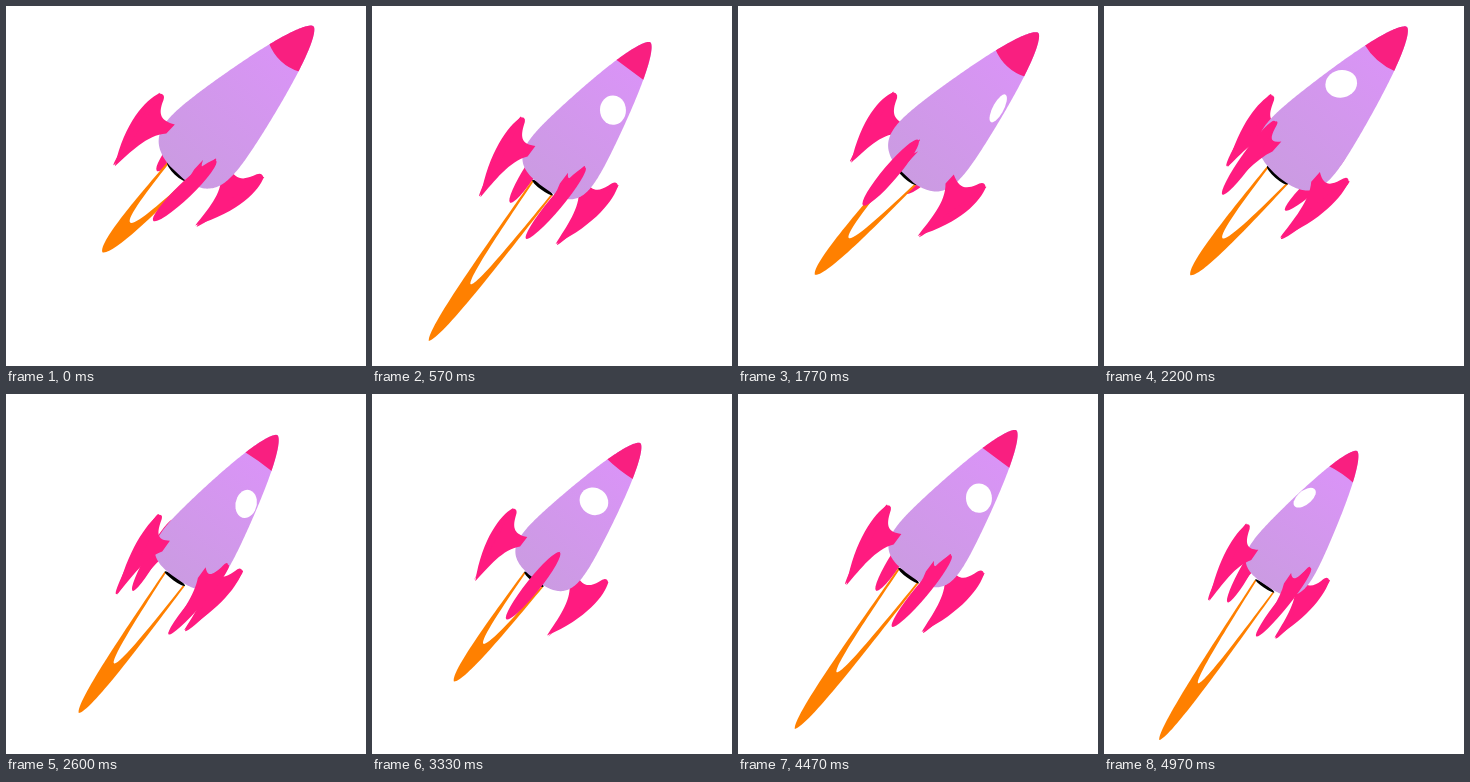
These frames come from a looping animation (360x360 px, 5000 ms). An HTML page:

```html
<!DOCTYPE html>
<html lang="en">
<head>
<meta charset="utf-8">
<title>Rocket</title>
<style>
  html, body { margin: 0; width: 100%; height: 100%; overflow: hidden; background: #fff; }
  svg { display: block; width: 100vw; height: 100vh; }
</style>
</head>
<body>
<svg viewBox="0 0 360 360">
  <defs>
    <linearGradient id="skin" gradientUnits="userSpaceOnUse" x1="40" y1="0" x2="200" y2="0">
      <stop offset="0" stop-color="#d994f6"/>
      <stop offset="1" stop-color="#cb9be2"/>
    </linearGradient>
    <clipPath id="hull"><path id="hullClip"/></clipPath>
  </defs>
  <!-- Local axes: x runs from nose to tail, y across the rocket. -->
  <g id="rocket">
    <g id="backFins" fill="#ff1b80"></g>
    <path id="flame" fill="#ff8000"/>
    <path id="flameCore" fill="#fff"/>
    <ellipse id="nozzle" cx="199.5" ry="14" fill="#000"/>
    <path id="body" fill="url(#skin)"/>
    <g clip-path="url(#hull)">
      <path id="cap" fill="#f91f80"/>
    </g>
    <g id="windows" fill="#fff"></g>
    <g id="frontFins" fill="#ff1b80"></g>
  </g>
</svg>
<script>
const LOOP = 5000, CYCLE = 1950, LENGTH = 198, TAU = Math.PI * 2;
const FIN = 'M150 70C165 76 200 76 245 52C222 50 195 50 180 36L166 36C173 50 168 56 156 61Q145 64 150 70Z';
const FIN_TOP = 150, FLAME_START = 200;
const $ = id => document.getElementById(id);
const wave = (t, peak) => Math.cos((t - peak) / CYCLE * TAU);
const set = (el, attrs) => { for (const k in attrs) el.setAttribute(k, attrs[k]); };
const matrix = (...m) => `matrix(${m.map(n => n.toFixed(4))})`;

function add(parent, tag, attrs) {
  const el = document.createElementNS('http://www.w3.org/2000/svg', tag);
  set(el, attrs);
  return parent.appendChild(el);
}

const fins = [0, 1, 2, 3].map(() => {
  const g = add($('backFins'), 'g', {});
  return {
    g,
    blade: add(g, 'path', { d: FIN }),
    edge: add(g, 'ellipse', { cx: 197, rx: 48, ry: 8 })
  };
});
const portholes = [0, 1].map(() => add($('windows'), 'ellipse', { rx: 15.5, ry: 17 }));

const radius = a => {
  const x = a / LENGTH;
  return 51 * x ** 0.62 * Math.max(0, 1 - x ** 10) ** 0.35;
};

// Outline of the turned hull when its nose leans towards the viewer.
function outline(tilt) {
  const upper = [], lower = [];
  for (let i = 1; i < 160; i++) {
    const a = LENGTH * (1 - Math.cos(Math.PI * i / 160)) / 2;
    const r = radius(a);
    const slope = (radius(a + 0.005) - radius(a - 0.005)) / 0.01;
    const c = -slope * tilt;
    if (Math.abs(c) > 1) continue;
    const u = (a + r * tilt * c).toFixed(2);
    const v = (r * Math.sqrt(1 - c * c)).toFixed(2);
    upper.push(`${u} ${v}`);
    lower.unshift(`${u} -${v}`);
  }
  return `M${upper.concat(lower).join('L')}Z`;
}

function drawFin({ g, blade, edge }, angle, tilt, stretch) {
  const s = Math.sin(angle), c = Math.cos(angle), lean = tilt * c;
  const k = stretch + 0.08 * c, shift = FIN_TOP * (1 - k);
  set(blade, { transform: matrix(k, 0, lean, s, shift, 0) });
  set(edge, { transform: matrix(k - 0.17 * lean, -0.17 * s, 0, c, shift + 95.5 * lean, 95.5 * s) });
  const layer = $(c > 0 ? 'frontFins' : 'backFins');
  if (g.parentNode !== layer) layer.appendChild(g);
}

function drawWindow(el, angle, tilt) {
  const s = Math.sin(angle), c = Math.cos(angle);
  set(el, {
    transform: matrix(1, 0.25 * s, 0, c, 83 + 27 * c * tilt, 24 * s),
    visibility: c > 0.27 ? 'visible' : 'hidden'
  });
}

function drawFlame(length) {
  const span = length - FLAME_START;
  const x = f => (FLAME_START + span * f).toFixed(2);
  const drop = (w, x1, y1, x2, y2, end) =>
    `M${x(0)} ${-w}C${x(x1)} ${-y1} ${x(x2)} ${-y2} ${x(end)} 0` +
    `C${x(x2)} ${y2} ${x(x1)} ${y1} ${x(0)} ${w}Z`;
  set($('flame'), { d: drop(14, 0.45, 12, 0.96, 9.5, 1) });
  set($('flameCore'), { d: drop(12, 0.3, 9, 0.62, 6, 0.63) });
}

function draw(t) {
  const scale = 0.91 + 0.09 * wave(t, 75);
  const lean = 51.5 - 4.6 * wave(t, -50);
  const pitch = wave(t, -50);
  const tilt = 0.12 + 0.12 * pitch;
  const x = 280.5 + 27.5 * wave(t, 60);
  const y = 38 - 19 * wave(t, 112);
  const spin = (103 / 360 + t / CYCLE) * TAU;
  const sway = 8 / 360 * TAU * wave(t, 1620);

  set($('rocket'), {
    transform: `translate(${x} ${y}) rotate(${180 - lean}) scale(${scale} ${-scale})`
  });

  const hull = outline(tilt);
  set($('body'), { d: hull });
  set($('hullClip'), { d: hull });

  const c = 39 + 4 * wave(t, 0), b = 3 + 7 * pitch;
  set($('cap'), { d: `M-20-30H${c}V-21Q${c + b} 0 ${c} 21V30H-20Z` });

  set($('nozzle'), { rx: 2 + 9 * tilt });

  const flicker = (1 + Math.cos((t * 8 / CYCLE - 0.35) * TAU)) / 2;
  drawFlame((350 + 22 * wave(t, 600) - 42 * (1 - flicker)) / scale);

  fins.forEach((fin, i) => drawFin(fin, spin + sway + i * TAU / 4, tilt, 0.96 - 0.09 * pitch));
  portholes.forEach((el, i) => drawWindow(el, spin + i * TAU / 2, tilt));
}

const begin = performance.now();
function tick() {
  draw((performance.now() - begin) % LOOP);
  requestAnimationFrame(tick);
}
tick();
</script>
</body>
</html>
```
